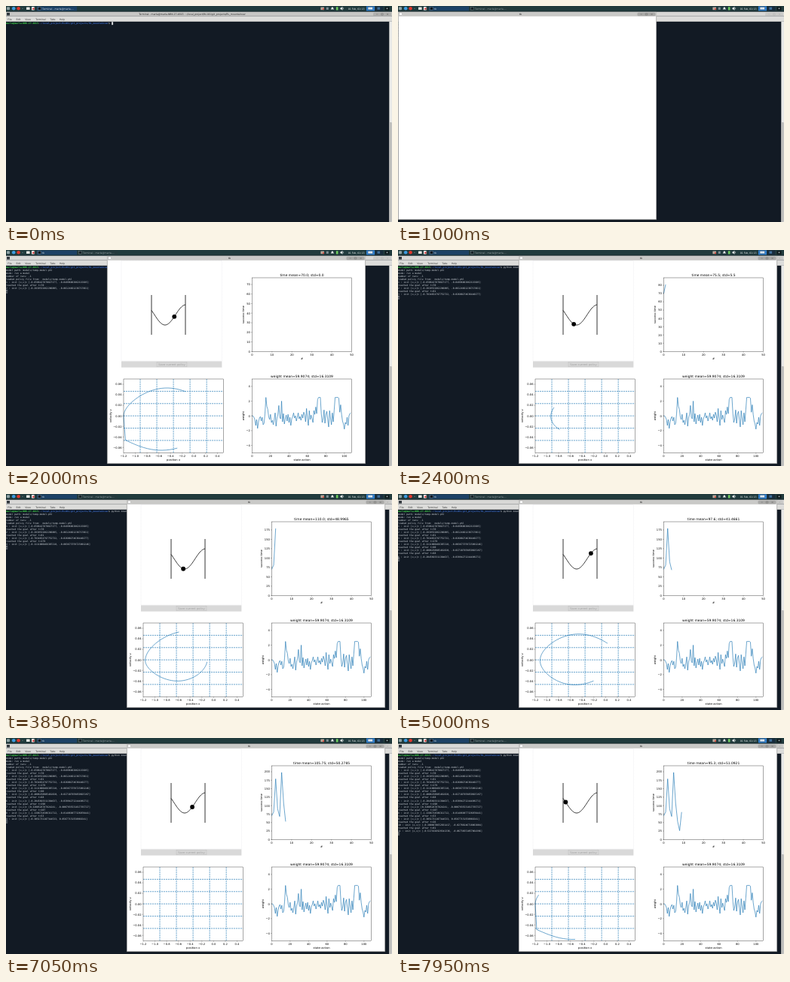
These frames come from a looping animation (512x288 px, 8 s). An HTML page:

```html
<!DOCTYPE html>
<html lang="en">
<head>
<meta charset="utf-8">
<title>Mountain car</title>
<style>
  html, body { margin: 0; width: 100%; height: 100%; overflow: hidden; background: #121a24; }
  svg { display: block; width: 100vw; height: 100vh; }
  text { white-space: pre; text-rendering: geometricPrecision; font-family: "DejaVu Sans", sans-serif; font-size: 3.7px; }
  .mono text { font-family: "DejaVu Sans Mono", monospace; font-size: 3.1px; fill: #d0d6dc; }
  .ui { font-size: 3.15px; }
  .line { fill: none; stroke: #1f77b4; stroke-width: .65; stroke-linejoin: round; }
</style>
</head>
<body>
<svg id="stage" viewBox="0 0 512 288"></svg>
<script>
const LOOP = 8000, FRAME = 50;
const OPEN = 950, PLOT = 1200;            // window opens, figure appears
const DRAG = [1534, 2160, 160];           // start, end, distance
const REFRESH = 9;                        // steps between redraws of the phase plot
const CELL = 1.867, ROW = 4.02;
const AW = 132.2, AH = 98.3;              // size of every axes box

const user = 'marla@marla-NBK-27-4815';
const cwd = '~/local_project/RL101/git_projects/RL_mountaincar';
const command = 'python mountaincar.py -r';
const intro = [
  'model path: models/temp-model.phl',
  'mode: run a model',
  'number of runs: -1',
  'loaded policy file from:  models/temp-model.phl'
];

// start position, start velocity, steps to the goal, push while moving left
const episodes = [
  ['-0.6506427870827177', '-0.04996063862115685', 70, .2],
  ['-0.2839532862206805', '-0.06124661236717661', 81, 0],
  ['-0.7834654797752732', '-0.02600274636440277', 179, 0],
  ['-0.1111000466307218', '-0.003673759723901246', 90, .52],
  ['-0.4006250905461820', '-0.027107959859025197', 68, .5],
  ['-0.2045693311384637', '-0.03994271244498271', 198, -.2],
  ['0.3200526787824241', '-0.0007935531817765727', 107, 0],
  ['-1.1386734506311712', '-0.014868877326070441', 53, 0],
  ['-0.3051731107344533', '0.05877151550966341', 26, .5],
  ['-0.3008670652831417', '-0.02788246718063804', 81, .5],
  ['-0.5171926929341336', '-0.06738551057064396', 58, 0]
].map(([x, v, steps, left]) => ({ x, v, steps, path: solve(+x, +v, steps, left) }));

// time and total number of steps
const pace = [[PLOT, 0], [1800, 88], [2400, 177], [3480, 330], [3850, 393], [6200, 731], [7950, 974]];

const weights = [
  0, 0, -2, -5, -13, -5, -17, -8, -3, -1, -7, -2, -12, -10, 3, 25,
  13, 9, -1, -5, 2, -9, -6, -12, -5, 4, -14, -3, 2, 14, -2, -4,
  20, -8, 3, -11, -4, 1, -7, 2, -9, -2, -13, -4, -1, 4, -3, 0,
  -7, -2, 4, -4, -1, -6, 2, -3, 5, 1, -8, 10, -3, -13, 7, -5,
  1, -4, -9, 7, 2, 12, 3, 22, 25, 25, 25, 3, -9, -4, 8, -10,
  2, 6, -5, -15, 7, -3, -12, 4, -8, 8, 25, 25, 25, 25, 24, 5,
  15, 2, -7, -11, -18, -9, -11, -2, -13, 0, 3, 4
];

// mountain car physics
function simulate(x, v, left, right) {
  const path = [[x, v]];
  while (x < .5 && path.length < 600) {
    v += .001 * (v < 0 ? -left : right) - .0025 * Math.cos(3 * x);
    v = Math.max(-.07, Math.min(.07, v));
    x += v;
    if (x < -1.2) { x = -1.2; v = 0; }
    path.push([Math.min(x, .5), v]);
  }
  return path;
}

// find the rightward push that needs the given number of steps
function solve(x, v, steps, left) {
  let best, miss = Infinity;
  for (let k = 0; k <= 200; k++) {
    const path = simulate(x, v, left, k / 200);
    const d = Math.abs(path.length - 1 - steps);
    if (d < miss) { miss = d; best = path; }
  }
  return best;
}

const rect = (x, y, w, h, fill, more = '') =>
  `<rect x="${x}" y="${y}" width="${w}" height="${h}" fill="${fill}" ${more}/>`;
const dot = (x, y, r, fill) => `<circle cx="${x}" cy="${y}" r="${r}" fill="${fill}"/>`;
const text = (x, y, s, more = '') => `<text x="${x}" y="${y}" ${more}>${s}</text>`;
const middle = 'text-anchor="middle"';
const poly = pts => 'M' + pts.map(p => p[0].toFixed(2) + ' ' + p[1].toFixed(2)).join('L');
const seg = (x1, y1, x2, y2) => `M${x1} ${y1}L${x2} ${y2}`;
const num = (v, d) => v.toFixed(d).replace('-', '\u2212');

function range(a, b, step) {
  const out = [];
  for (let i = 0; a + i * step <= b + 1e-9; i++) out.push(a + i * step);
  return out;
}

const scale = (o, [x0, x1], [y0, y1]) => ([x, y]) =>
  [o[0] + (x - x0) / (x1 - x0) * AW, o[1] + AH - (y - y0) / (y1 - y0) * AH];

// frame, ticks and labels; xt and yt are [ticks, decimals]
function axes(o, xr, yr, xt, yt, names, gap) {
  const [x, y] = o, to = scale(o, xr, yr), bottom = y + AH;
  let d = '', s = '';
  for (const v of xt[0]) {
    const px = to([v, 0])[0];
    d += seg(px, bottom, px, bottom + 1.3);
    s += text(px, bottom + 5.6, num(v, xt[1]), middle);
  }
  for (const v of yt[0]) {
    const py = to([xr[0], v])[1];
    d += seg(x, py, x - 1.3, py);
    s += text(x - 2.5, py + 1.35, num(v, yt[1]), 'text-anchor="end"');
  }
  s += text(x + AW / 2, bottom + 10.7, names[0], middle);
  s += `<text ${middle} transform="translate(${x - gap} ${y + AH / 2}) rotate(-90)">${names[1]}</text>`;
  if (names[2]) s += text(x + AW / 2, y - 2.3, names[2], middle + ' style="font-size:4.45px"');
  return `<path d="${d}" stroke="#000" stroke-width=".3"/>` +
    rect(x, y, AW, AH, 'none', 'stroke="#000" stroke-width=".35"') + s;
}

const phaseAt = [22, 172], timeAt = [192.4, 37], weightAt = [192.4, 172];
const phaseX = [-1.2, .5], phaseY = [-.07, .07];
const phase = scale(phaseAt, phaseX, phaseY);
const weight = scale(weightAt, [0, 108], [-5, 5]);
const hill = x => [59 + (x + 1.2) / 1.7 * 45, 86.5 - 13.5 * Math.sin(3 * x)];

function grid() {
  let d = '';
  for (let i = 1; i < 6; i++) {
    const gx = phaseAt[0] + AW * i / 6, gy = phaseAt[1] + AH * i / 6;
    d += seg(gx, phaseAt[1] + AH, gx, phaseAt[1]) + seg(phaseAt[0], gy, phaseAt[0] + AW, gy);
  }
  return `<path class="line" stroke-dasharray="2.1 .9" d="${d}"/>`;
}

function buttons(x, color) {
  return rect(x, 8.7, 24, 4.6, color, 'rx="1.5"') +
    `<path d="M${x + 4} 11h2.4M${x + 10.8} 9.9h2.4v2.2h-2.4zM${x + 18} 9.9l2.2 2.2m0-2.2l-2.2 2.2" fill="none" stroke="#666" stroke-width=".45"/>`;
}

const terminal = () =>
  rect(0, 7, 512, 281, '#121a24') +
  rect(0, 7.4, 512, 6.2, '#c6c6c4', 'id="bar"') +
  rect(0, 13.6, 512, 7.2, '#dcdcda') +
  rect(1, 9, 4, 3.6, '#30363c') +
  text(247, 12.1, `Terminal - ${user}: ${cwd}`, middle + ' class="ui" id="caption"') +
  `<g id="termButtons">${buttons(487, '#b0b0ae')}</g>` +
  [['File', 5], ['Edit', 16.5], ['View', 29], ['Terminal', 46], ['Tabs', 62], ['Help', 74.5]]
    .map(([s, x]) => text(x, 18.6, s, middle + ' class="ui" fill="#333"')).join('') +
  rect(508.3, 20.8, 3.7, 267.2, '#e9e9e7') +
  rect(508.6, 155, 3.2, 133, '#bcbcba', 'rx="1"') +
  `<g class="mono"><g id="out"></g>` +
  rect(0, 0, 1.7, 3.6, '#e6e8ea', 'id="cursor" stroke="#d5d9dd" stroke-width=".35"') + '</g>';

const figure = () =>
  rect(19, 14.6, 133.4, 133.4, 'none', 'stroke="#dadae2" stroke-width=".5" stroke-dasharray="1 1"') +
  rect(19, 148.4, 133.4, 8.2, '#d9d9d9') +
  rect(66, 149.2, 40, 6.6, '#d5d5d5', 'stroke="#bdbdbd" stroke-width=".4"') +
  text(86, 153.8, 'Save current policy', middle + ' fill="#a3a3a3"') +
  `<path d="${seg(59, 60, 59, 113)}${seg(104, 60, 104, 113)}" stroke="#000" stroke-width=".8"/>` +
  `<path d="${poly(range(-1.2, .5, .034).map(hill))}" fill="none" stroke="#000" stroke-width=".8"/>` +
  '<circle id="car" r="2.9"/>' +
  grid() + '<path id="orbit" class="line"/>' +
  axes(phaseAt, phaseX, phaseY, [range(-1.2, .41, .2), 1], [range(-.06, .061, .02), 2], ['position x', 'velocity v'], 15.8) +
  `<path class="line" d="${poly(weights.map((w, i) => weight([i, w / 10])))}"/>` +
  axes(weightAt, [0, 108], [-5, 5], [range(0, 100, 20), 0], [range(-4, 4, 2), 0],
    ['state-action', 'weight', 'weight mean=59.9074; std=16.3109'], 10.2) +
  '<g id="times"></g>';

const plotWindow = () =>
  rect(.25, 7.6, 342.5, 277.2, '#fff', 'stroke="#8c8c8a" stroke-width=".6"') +
  rect(.3, 7.8, 342.4, 6, '#c9c9c7') +
  rect(1.4, 9, 4.2, 3.6, '#fafafa', 'stroke="#777" stroke-width=".3"') +
  text(162.5, 12, 'tk', middle + ' class="ui"') + buttons(317.5, '#a9a9a7') +
  `<g id="figure">${figure()}</g>`;

const task = (x, s, on) =>
  rect(x, .4, 53, 6.2, on ? '#1d4266' : '#24393c', 'rx=".6"') +
  rect(x + 1.6, 1.7, 3.6, 3.4, on ? '#0f161d' : '#18242a', 'stroke="#9aa6ac" stroke-width=".3"') +
  text(x + 7, 4.6, s, `class="ui" fill="${on ? '#dfe6ea' : '#95a2a6'}"`);
const termName = 'Terminal - marla@marla-...';

const panel = () =>
  rect(0, 0, 512, 7.2, '#213b3d') + rect(0, 6.7, 512, .7, '#14272a') +
  rect(1, 1.2, 4, 4, '#8fa3a6', 'rx="1"') + dot(10.2, 3.2, 2.3, '#3d9be0') + dot(16.6, 3.2, 2.3, '#e0362c') +
  dot(22, 3.2, .5, '#9fb0b2') +
  rect(27, 1.5, 4.6, 3.6, '#e4e6e2', 'rx=".4"') + rect(34, 1, 3.6, 4.6, '#f4f4f4') + rect(35.2, 2.5, 2.4, 2.4, '#d64545') +
  `<g id="soloTask">${task(41, termName, true)}</g>` +
  `<g id="pairTask">${task(41, 'tk', true)}${task(95, termName, false)}</g>` +
  rect(417.4, 1.4, 4.6, 3.8, '#b9a79a', 'rx=".5"') + dot(421, 4.2, 1.1, '#d2483c') +
  rect(424.8, 1.7, 3, 3.2, '#7f9094') +
  '<path d="M430.7 4.6q1-.8 1-2t1.2-1.2t1.2 1.2t1 2z" fill="#e8ecec"/>' +
  rect(437.9, 1.2, 2.6, 4.4, '#6fcf5f', 'rx=".4"') +
  '<path d="M443.6 2.4h1.2l1.4-1.3v4.4l-1.4-1.3h-1.2zM447.2 2q1 1.3 0 2.6" fill="#e8ecec" stroke="#e8ecec" stroke-width=".3"/>' +
  text(464.6, 4.5, '01 Feb, 01:13', middle + ' class="ui" fill="#e6ecec"') +
  rect(478, .4, 11, 6, '#2f80d2') + rect(480, 1.3, 6.5, 3.6, '#d9e6f2', 'stroke="#17395c" stroke-width=".4"') +
  rect(489.6, .4, 10.6, 6, '#182c3c') + rect(492.5, 1.6, 3.6, 3.2, '#3f6f9a') +
  rect(502.5, 1, 6, 5, '#111d20', 'rx=".6"') + dot(505.5, 3.4, .8, '#b8c6c8');

const stage = document.getElementById('stage');
stage.innerHTML = terminal() + `<g id="win">${plotWindow()}</g>` + panel();
const $ = id => document.getElementById(id);
const set = (id, attrs) => { for (const k in attrs) $(id).setAttribute(k, attrs[k]); };
const show = (id, on) => set(id, { display: on ? 'inline' : 'none' });

function stepAt(t) {
  if (t <= PLOT) return 0;
  const i = Math.max(1, pace.findIndex(p => p[0] >= t));
  const [t0, s0] = pace[i - 1], [t1, s1] = pace[i];
  return Math.floor(s0 + (s1 - s0) * (t - t0) / (t1 - t0));
}

// six significant digits, cut off rather than rounded
function stat(v) {
  const unit = 10 ** (5 - Math.floor(Math.log10(v || 1)));
  const n = Math.floor(v * unit + 1e-6) / unit;
  return Number.isInteger(n) ? n.toFixed(1) : String(n);
}

let timesShown = -1;
function drawTimes(count) {
  if (count === timesShown) return;
  timesShown = count;
  const done = episodes.slice(0, count).map(e => e.steps);
  const top = count ? Math.max(...done) * 1.1 : 1;
  const tick = count ? (top < 100 ? 10 : 25) : .2;
  let title = '';
  if (count) {
    const mean = done.reduce((a, b) => a + b, 0) / count;
    const std = Math.sqrt(done.reduce((a, b) => a + (b - mean) ** 2, 0) / count);
    title = `time mean=${stat(mean)}; std=${stat(std)}`;
  }
  const to = scale(timeAt, [0, 50], [0, top]);
  $('times').innerHTML =
    (count > 1 ? `<path class="line" d="${poly(done.map((v, i) => to([i, v])))}"/>` : '') +
    axes(timeAt, [0, 50], [0, top], [range(0, 50, 10), 0], [range(0, top, tick), count ? 0 : 1],
      ['#', 'success time', title], top < 100 ? 10.2 : 12.4);
}

let outShown = '';
function drawTerminal(t, current) {
  const typed = command.slice(0, Math.max(0, Math.ceil((t - 50) / 600 * command.length)) * (t >= 100));
  const entered = t >= 700;
  const count = t >= OPEN ? 4 : t >= 850 ? 3 : t >= 800 ? 2 : t >= 750 ? 1 : 0;
  const lines = intro.slice(0, count);
  if (t >= PLOT) {
    for (let i = 0; i <= current; i++) {
      const e = episodes[i];
      lines.push(`${i + 1} : init [x,v]= [${e.x}, ${e.v}]`);
      if (i < current) lines.push(`reached the goal after t=${e.steps}`);
    }
  }
  const base = row => 24.2 + row * ROW;
  const html = text(0, base(0),
    `<tspan fill="#3fd64a" font-weight="bold">${user}</tspan>:<tspan fill="#3566c4" font-weight="bold">${cwd}</tspan>$ ${typed}`) +
    lines.map((s, i) => text(0, base(i + 1), s)).join('');
  if (html !== outShown) $('out').innerHTML = outShown = html;
  const col = entered ? 0 : user.length + cwd.length + 3 + typed.length;
  const row = entered ? lines.length + 1 : 0;
  set('cursor', { x: col * CELL + .2, y: 21.4 + row * ROW, fill: t >= OPEN ? 'none' : '#e6e8ea' });
}

function update(time) {
  const t = Math.floor(time % LOOP / FRAME) * FRAME;
  const open = t >= OPEN;
  let step = stepAt(t), current = 0;
  while (current < episodes.length - 1 && step >= episodes[current].steps) step -= episodes[current++].steps;
  drawTerminal(t, current);

  show('win', open);
  show('figure', t >= PLOT);
  show('soloTask', !open);
  show('pairTask', open);
  set('bar', { fill: open ? '#d8d8d6' : '#c6c6c4' });
  set('caption', { fill: open ? '#999' : '#222' });
  set('termButtons', { opacity: open ? .35 : 1 });
  if (!open) return;

  const u = Math.max(0, Math.min(1, (t - DRAG[0]) / (DRAG[1] - DRAG[0])));
  set('win', { transform: `translate(${(DRAG[2] * u * u * (3 - 2 * u)).toFixed(2)} 0)` });

  // the car moves on every step, the phase plot follows in jumps
  const { path, steps } = episodes[current];
  const index = s => Math.min(path.length - 1, Math.round(s * (path.length - 1) / steps));
  const [cx, cy] = hill(path[index(step)][0]);
  set('car', { cx, cy });
  set('orbit', { d: poly(path.slice(0, index(step - step % REFRESH) + 1).map(phase)) });
  drawTimes(current);
}

const start = performance.now();
function tick() {
  update(performance.now() - start);
  requestAnimationFrame(tick);
}
tick();
</script>
</body>
</html>
```
